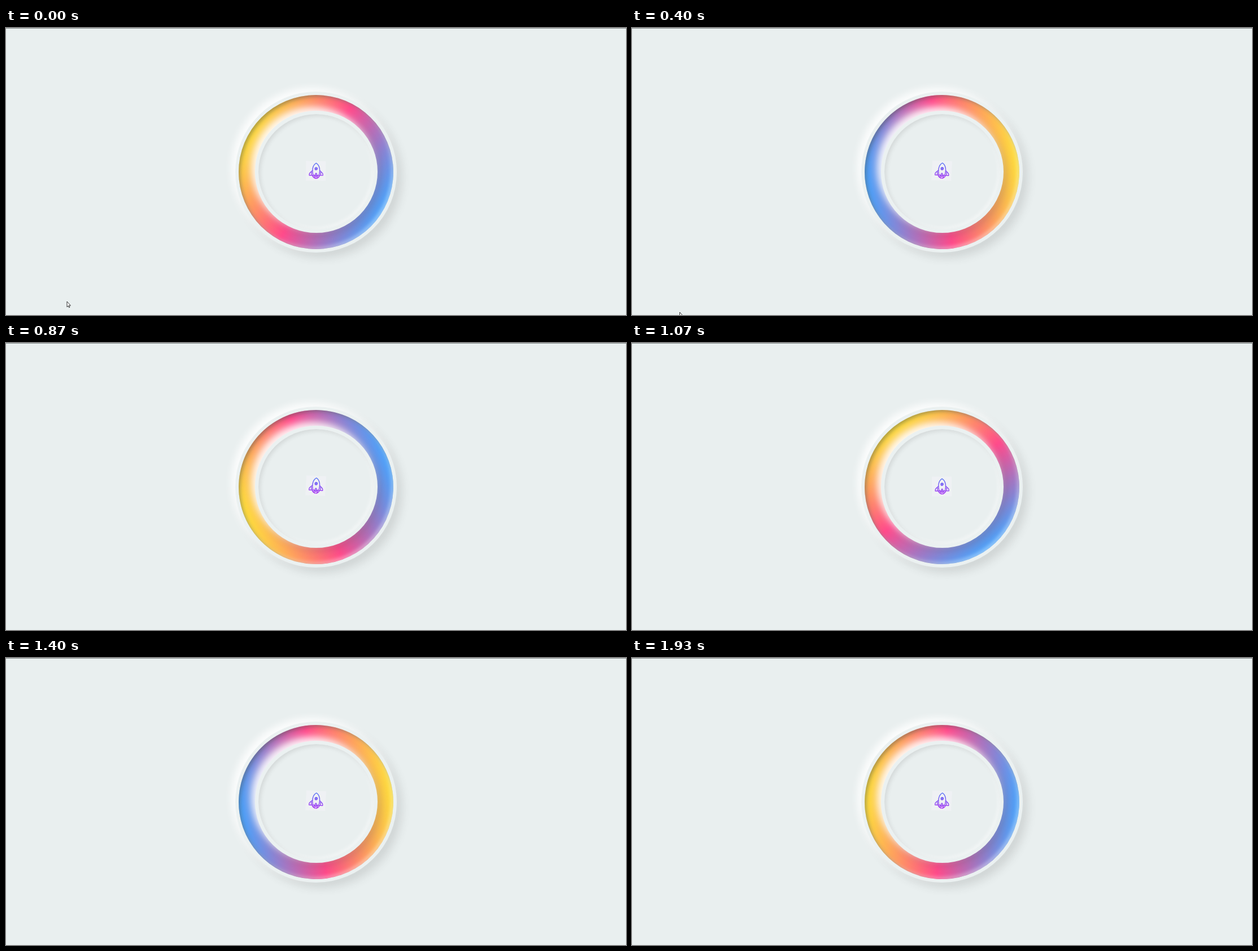
Animation of 1098 by 510 pixels, one loop 1.99 s. Source, as an HTML page:

```html
<!DOCTYPE html>
<html lang="en">
<head>
<meta charset="utf-8">
<title>Loader</title>
<style>
  html, body { margin: 0; width: 100%; height: 100%; overflow: hidden; }
  body { position: relative; background: #e9efef; }
  .topline { position: absolute; left: 0; top: 0; width: 100%; height: 1px; background: #828989; }
  .disc { position: absolute; border-radius: 50%; box-sizing: border-box; }
  .rim {
    left: 406px; top: 112.5px; width: 286px; height: 286px; background: #ebf1f1;
    box-shadow: -7px -7px 13px rgba(255, 255, 255, .85), 9px 9px 16px rgba(70, 70, 70, .15);
  }
  .band, .shade { left: 412px; top: 118.5px; width: 274px; height: 274px; }
  .band { background: linear-gradient(#fde03c, #ff4b8b, #48a4fc); }
  .shade {
    box-shadow: inset 3px 3px 6px rgba(70, 70, 70, .42), inset -3px -3px 7px rgba(255, 255, 255, .42);
  }
  .hub {
    left: 441px; top: 147px; width: 217px; height: 217px;
    background: #e9efef; border: 6px solid #ebf1f1;
    box-shadow:
      -7px -7px 14px rgba(255, 255, 255, .92), 7px 7px 14px rgba(70, 70, 70, .18),
      inset 3px 3px 7px rgba(70, 70, 70, .13), inset -3px -3px 7px rgba(255, 255, 255, .5);
  }
  svg { position: absolute; left: 0; top: 0; }
</style>
</head>
<body>
<div class="topline"></div>
<div class="disc rim"></div>
<div class="disc band" id="band"></div>
<div class="disc shade"></div>
<div class="disc hub"></div>
<svg width="1098" height="510" viewBox="0 0 1098 510">
  <defs>
    <linearGradient id="ink" gradientUnits="userSpaceOnUse" x1="0" y1="-14" x2="0" y2="14">
      <stop offset="0" stop-color="#5a78f5"/>
      <stop offset="1" stop-color="#a934f2"/>
    </linearGradient>
  </defs>
  <g id="rocket" fill="none" stroke="url(#ink)" stroke-width="1.4" stroke-linejoin="round" stroke-linecap="round">
    <rect x="-17.5" y="-17.5" width="35" height="35" fill="#eff1f4" stroke="none"/>
    <path d="M-4.5 8C-7.2-1-6-10 .5-13.7C7-10 8.2-1 5.5 8Z"/>
    <circle cx=".5" cy="-3.8" r="2.1" fill="#8d7df5"/>
    <path d="M-6-.5L-10.3 3.5Q-11.5 4.8-11.5 6.5V8H-7.6V2.5M-7.6 8H-4.5"/>
    <path d="M7-.5L11.3 3.5Q12.5 4.8 12.5 6.5V8H8.6V2.5M8.6 8H5.5"/>
    <path d="M-5.5 8V9.5Q-5.5 11-3.5 11V12.2H-1.5V13.4H2.5V12.2H4.5V11Q6.5 11 6.5 9.5V8"/>
    <path d="M-2.5 11V7.5M3.5 11V7.5M-.7 10V5.2Q.5 3.8 1.7 5.2V10Q.5 12-.7 10Z"/>
  </g>
  <path id="cursor" d="M.5.5V10.3L2.7 8.3L4.1 11.3L5.5 10.6L4.1 7.7H6.9Z" fill="#fff" stroke="#222" stroke-width=".9"/>
</svg>
<script>
  const LOOP = 1990, STEP = 200 / 3, SHAKE = 500;
  const band = document.getElementById('band');
  const rocket = document.getElementById('rocket');
  const cursor = document.getElementById('cursor');

  // time, x, y, tilt
  const shakeKeys = [
    [0, 548.7, 253.8, 0.5], [100, 548.6, 255.5, -1], [200, 548.6, 255.5, -1],
    [350, 548.6, 253.6, 3], [440, 548.6, 253.6, 3], [500, 548.7, 253.8, 0.5]
  ];
  // time, x, y
  const cursorKeys = [[0, 107.5, 485.5], [400, 84, 504.5], [540, 69.5, 508.5]];

  function tween(keys, t) {
    const i = Math.max(1, keys.findIndex(k => k[0] >= t));
    const a = keys[i - 1], b = keys[i];
    const p = (t - a[0]) / (b[0] - a[0]);
    return a.slice(1).map((v, j) => v + (b[j + 1] - v) * p);
  }

  function draw(now) {
    // 15 poses a second, each starting on a 10 ms tick
    const tick = Math.floor((now % LOOP) / 10) * 10;
    const t = Math.floor((tick + 5) / STEP) * STEP;

    band.style.transform = `rotate(${298 + t * 0.36}deg)`;

    const [x, y, tilt] = tween(shakeKeys, t % SHAKE);
    rocket.setAttribute('transform', `translate(${x} ${y}) rotate(${tilt})`);

    const shown = t < 540;
    cursor.style.display = shown ? '' : 'none';
    if (shown) cursor.setAttribute('transform', `translate(${tween(cursorKeys, t)})`);
  }

  const start = performance.now();
  function loop() {
    draw(performance.now() - start);
    requestAnimationFrame(loop);
  }
  loop();
</script>
</body>
</html>
```
